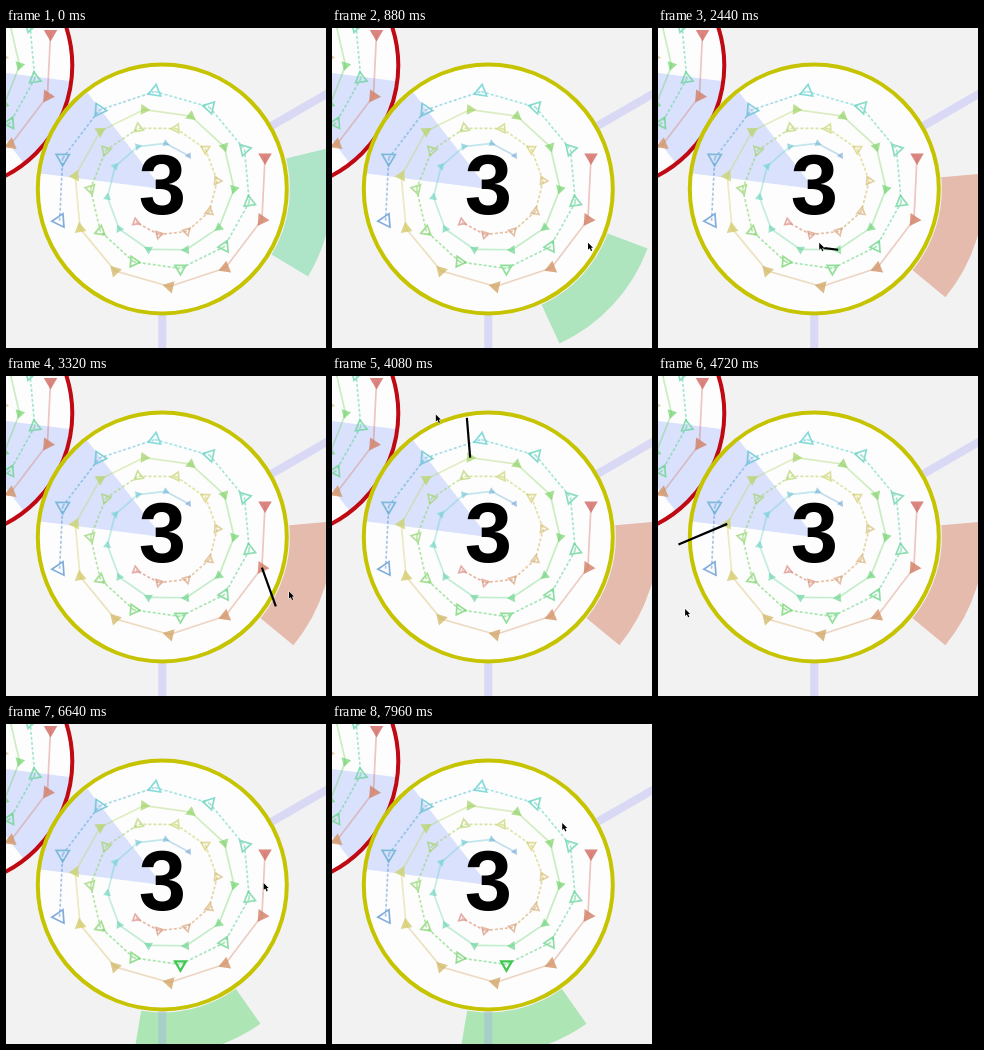
Write an HTML page with a canvas that moves like this. It is 320x320 px and loops after 8 s.

```html
<!DOCTYPE html>
<html>
<head>
<meta charset="utf-8">
<style>
html, body { margin: 0; width: 100%; height: 100%; overflow: hidden; background: #f2f2f2; }
canvas { display: block; width: 320px; height: 320px; }
</style>
</head>
<body>
<canvas id="stage"></canvas>
<script>
const canvas = document.getElementById('stage');
const g = canvas.getContext('2d');
const scale = window.devicePixelRatio || 1;
canvas.width = canvas.height = 320 * scale;

const LOOP = 8000, RAD = Math.PI / 180, STEP = 360 / 42, LAG = 85;
const CX = 156.3, CY = 161, R = 124.5;
const polar = (r, deg) => ({ x: r * Math.cos(deg * RAD), y: r * Math.sin(deg * RAD) });

// Two interleaved spirals of 21 notes, four steps of the 42-part circle apart.
function spiral(start, lean, hue, hueStep) {
  return Array.from({ length: 21 }, (_, i) => {
    const angle = (start + 4 * i) * STEP;
    return {
      ...polar(107.5 - 3.25 * i, angle),
      angle,
      tip: angle + lean,
      size: 7.8 - 0.19 * i,
      hue: hue + hueStep * i
    };
  });
}
const solid = spiral(-2, -13, 4, 10.3);
const dashed = spiral(19, 13, 210, -10.3);

// Pointer stops around the dial: time, angle, radius
const stops = [
  [600, 70, 172], [760, 44, 86], [880, 29, 115], [1200, 17, 112],
  [2355, 84, 59], [2440, 84, 56], [3500, 5, 150], [3995, -100, 121],
  [4080, -113, 131], [4635, -183, 136], [4720, -209.5, 148],
  [5640, -643, 88], [7200, -730, 112], [7960, -758.7, 96]
];

// Smooth curve through the stops
function pointer(t) {
  const last = stops.length - 1;
  let i = 0;
  while (i < last - 1 && stops[i + 1][0] <= t) i++;
  const a = stops[i], b = stops[i + 1], span = b[0] - a[0];
  const u = Math.max(0, Math.min(1, (t - a[0]) / span));
  const slope = (k, axis) => {
    const p = stops[Math.max(0, k - 1)], n = stops[Math.min(last, k + 1)];
    return (n[axis] - p[axis]) / (n[0] - p[0]) * span;
  };
  const at = axis => {
    const d = b[axis] - a[axis], m = slope(i, axis), n = slope(i + 1, axis);
    return a[axis] + u * (m + u * (3 * d - 2 * m - n + u * (m + n - 2 * d)));
  };
  const p = polar(at(2), at(1));
  return { x: CX + p.x, y: CY + p.y };
}

function line(x1, y1, x2, y2, color, width) {
  g.strokeStyle = color;
  g.lineWidth = width;
  g.beginPath();
  g.moveTo(x1, y1);
  g.lineTo(x2, y2);
  g.stroke();
}

function sector(x, y, mid, inner, outer, color) {
  const from = (mid - 22.4) * RAD, to = (mid + 22.4) * RAD;
  g.beginPath();
  g.arc(x, y, outer, from, to);
  g.arc(x, y, inner, to, from, true);
  g.closePath();
  g.fillStyle = color;
  g.fill();
}

function drawSpiral(notes, active) {
  const hollow = notes === dashed;
  g.setLineDash(hollow ? [3, 2] : []);
  for (let i = 1; i < notes.length; i++) {
    const a = notes[i - 1], b = notes[i];
    line(a.x, a.y, b.x, b.y, `hsla(${a.hue},55%,60%,${hollow ? 0.55 : 0.38})`, 1.7);
  }
  g.setLineDash([]);
  notes.forEach((n, i) => {
    const on = n === active;
    g.beginPath();
    for (let k = 0; k < 3; k++) {
      const p = polar(n.size, n.tip + 120 * k);
      g.lineTo(n.x + p.x, n.y + p.y);
    }
    g.closePath();
    g.lineWidth = on ? 2.2 : 1.7;
    g.strokeStyle = g.fillStyle = `hsla(${n.hue},55%,${on ? 52 : 62}%,${on ? 1 : 0.85 - i * 0.014})`;
    hollow ? g.stroke() : g.fill();
  });
}

function dial(x, y, color, link, active) {
  g.save();
  g.translate(x, y);
  g.beginPath();
  g.arc(0, 0, R, 0, 7);
  g.fillStyle = '#fdfdfd';
  g.fill();
  sector(0, 0, link, 0, R, '#d9e1fc');
  drawSpiral(dashed, active);
  drawSpiral(solid, active);
  g.beginPath();
  g.arc(0, 0, R, 0, 7);
  g.strokeStyle = color;
  g.lineWidth = 4;
  g.stroke();
  g.restore();
}

function arrow({ x, y }) {
  g.beginPath();
  [[0, 0], [0, 7], [1.7, 5.6], [3, 8.4], [4.2, 7.8], [3, 5.2], [5, 5]]
    .forEach(([dx, dy]) => g.lineTo(x + dx - 1, y + dy - 2));
  g.closePath();
  g.strokeStyle = '#fff';
  g.lineWidth = 1;
  g.stroke();
  g.fillStyle = '#000';
  g.fill();
}

function chosen(t) {
  if (t < 740) return dashed[6];
  if (t < 1120) return dashed[7];
  return t < 5640 ? solid[1] : dashed[8];
}

function draw(t) {
  g.setTransform(scale, 0, 0, scale, 0, 0);
  g.fillStyle = '#f2f2f2';
  g.fillRect(0, 0, 320, 320);

  const note = chosen(t);
  sector(CX, CY, note.angle, 127.5, 170, `hsl(${note.hue},52%,79%)`);
  const bar = 'rgba(140,140,255,.25)', far = polar(200, -30);
  line(CX, CY, CX, 330, bar, 8);
  line(CX, CY, CX + far.x, CY + far.y, bar, 8);

  dial(CX - 214.5, CY - 123.5, '#bf0a14', 29.7);
  dial(CX, CY, '#c6c400', 209.7, t > 5660 && note);

  g.fillStyle = '#000';
  g.font = 'bold 85px "Liberation Sans", Arial, sans-serif';
  g.textAlign = 'center';
  g.fillText('3', 156.5, 186);

  // A string runs from the nearest solid note to where the pointer just was.
  if (t >= 2300 && t < 5560) {
    const end = pointer(t - LAG);
    const gap = n => Math.hypot(CX + n.x - end.x, CY + n.y - end.y);
    const n = solid.reduce((a, b) => gap(b) < gap(a) ? b : a);
    line(CX + n.x, CY + n.y, end.x, end.y, '#000', 2.2);
  }
  if (t >= 600) arrow(pointer(t));
}

const begin = performance.now();
function frame() {
  draw((performance.now() - begin) % LOOP);
  requestAnimationFrame(frame);
}
frame();
</script>
</body>
</html>
```
